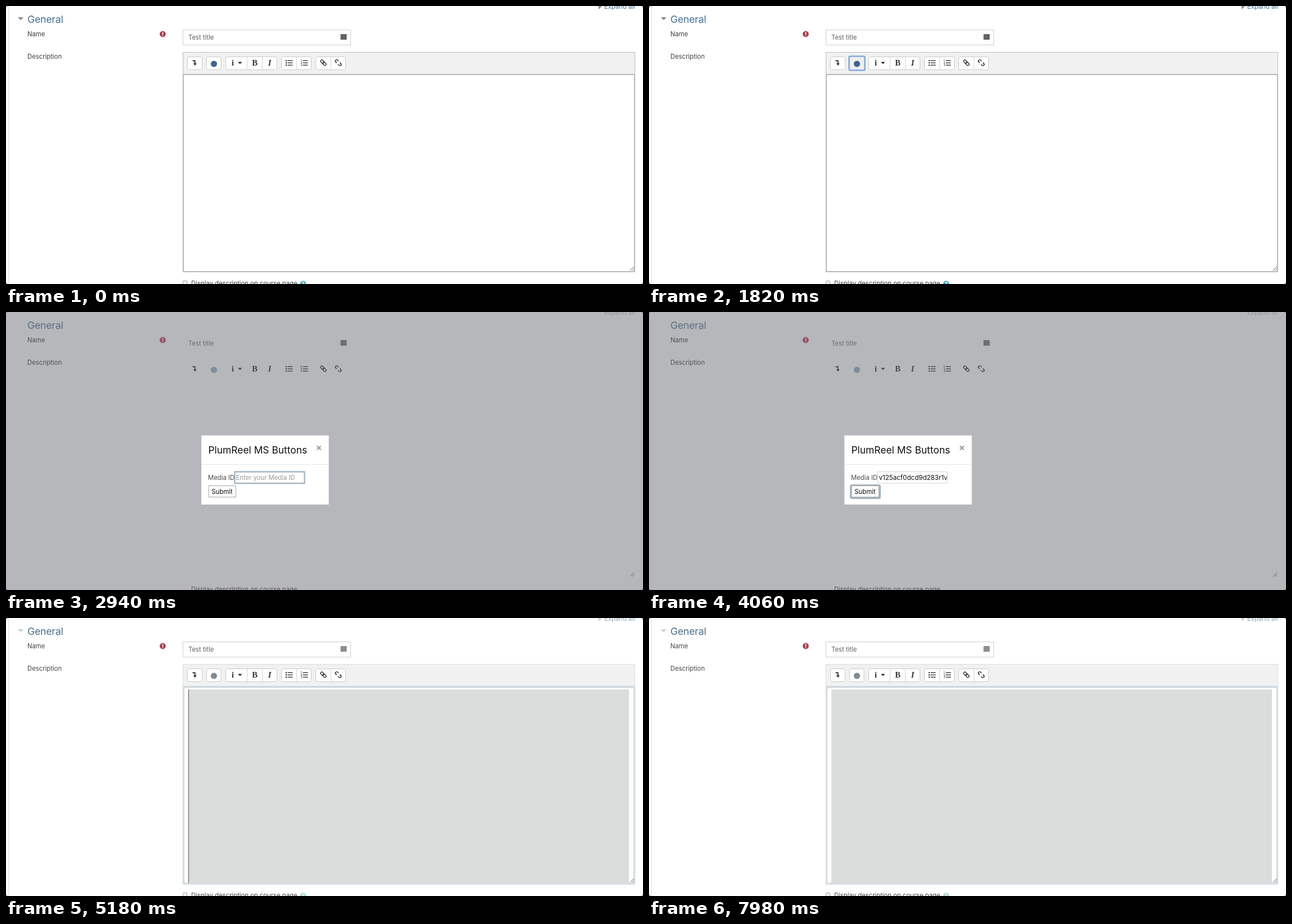
An HTML page with a canvas that plays this animation: 1132x495 px, repeating every 8 s.

```html
<!DOCTYPE html>
<html lang="en">
<head>
<meta charset="utf-8">
<title>Editor button demo</title>
<style>
  html, body { margin: 0; width: 100%; height: 100%; overflow: hidden; background: #fff; }
  canvas { display: block; }
</style>
</head>
<body>
<canvas id="stage" width="1132" height="495"></canvas>
<script>
const W = 1132, H = 495, LOOP = 8000;
const ctx = document.getElementById('stage').getContext('2d');
const SANS = 'Inter, Roboto, sans-serif';
const SERIF = '"Liberation Serif", "Noto Serif", serif';

// Moments of the user's actions, in ms
const T = { press: 1750, open: 1890, focusField: 2590, paste: 3080, submit: 3990, insert: 4130 };
const CARET_PERIOD = 1000;

const plain = {
  bg: '#fff', text: '#3c3f42', heading: '#44708f', link: '#44708f', toggle: '#8b8b8b',
  alert: '#a5414a', field: '#5c6063', key: '#636363', logo: '#426591', icon: '#333',
  help: '#46a8bd', barBorder: '#bcbcbc', areaBorder: '#b8b8b8', boxes: true
};
const dimmed = {
  ...plain, bg: '#b6b7bb', text: '#505357', heading: '#5c7182', link: '#96999d',
  alert: '#96505f', field: '#6a6d71', key: '#6c6f73', logo: '#7e8c9b', icon: '#45484c', boxes: false
};
const inserted = {
  ...plain, text: '#43474a', heading: '#4c7087', link: '#8fa7b5', toggle: '#cfd0d0',
  field: '#5f6366', key: '#8b8e90', logo: '#818b94', help: '#a9d3d1', barBorder: '#dcdddd'
};

function fill(color, x, y, w, h) {
  ctx.fillStyle = color;
  ctx.fillRect(x, y, w, h);
}

function box(x, y, w, h, border, { inside, radius = 0, line = 1 } = {}) {
  ctx.beginPath();
  ctx.roundRect(x, y, w, h, radius);
  if (inside) { ctx.fillStyle = inside; ctx.fill(); }
  ctx.strokeStyle = border;
  ctx.lineWidth = line;
  ctx.stroke();
}

function text(str, x, y, color, size = 11.3, { weight = 400, family = SANS, align = 'left', style = '' } = {}) {
  ctx.font = `${style} ${weight} ${size}px ${family}`;
  ctx.textAlign = align;
  ctx.fillStyle = color;
  ctx.fillText(str, x, y);
}

function poly(color, ...pts) {
  ctx.beginPath();
  pts.forEach(([x, y]) => ctx.lineTo(x, y));
  ctx.fillStyle = color;
  ctx.fill();
}

function path(color, width, ...pts) {
  ctx.beginPath();
  pts.forEach(([x, y]) => ctx.lineTo(x, y));
  ctx.strokeStyle = color;
  ctx.lineWidth = width;
  ctx.stroke();
}

function disc(color, x, y, r) {
  ctx.beginPath();
  ctx.arc(x, y, r, 0, Math.PI * 2);
  ctx.fillStyle = color;
  ctx.fill();
}

// A run of joined buttons; edges are the x positions of the borders
function buttonGroup(edges) {
  const left = edges[0], right = edges[edges.length - 1];
  box(left + .5, 90.5, right - left - 1, 23, '#cbcbcb', { inside: '#fff', radius: 3 });
  edges.slice(1, -1).forEach(x => fill('#d2d2d2', x, 91, 1, 22));
}

function chain(x, y, color) {
  ctx.save();
  ctx.translate(x, y);
  ctx.rotate(Math.PI / 4);
  const link = { radius: 2.2, line: 1.4 };
  box(-6, -2.2, 6.6, 4.4, color, link);
  box(-.6, -2.2, 6.6, 4.4, color, link);
  ctx.restore();
}

// Two open half links with small sparks beside the break
function brokenChain(x, y, color) {
  ctx.save();
  ctx.translate(x, y);
  ctx.rotate(Math.PI / 4);
  ctx.strokeStyle = color;
  ctx.lineWidth = 1.4;
  for (const side of [-1, 1]) {
    ctx.beginPath();
    ctx.moveTo(side * 1.6, -2.4);
    ctx.lineTo(side * 4, -2.4);
    ctx.arc(side * 4, 0, 2.4, -Math.PI / 2, Math.PI / 2, side < 0);
    ctx.lineTo(side * 1.6, 2.4);
    ctx.stroke();
  }
  ctx.restore();
  path(color, .9, [x - 5, y - 2.5], [x - 3, y - 1.8]);
  path(color, .9, [x + 3, y + 1.8], [x + 5, y + 2.5]);
}

function listIcon(x, color, numbered) {
  [97, 101, 105].forEach((y, i) => {
    fill(color, x - 2.5, y - .4, 9, 1.4);
    if (numbered) text(i + 1, x - 6.5, y + 2, color, 4.6, { weight: 500 });
    else disc(color, x - 5, y + .3, 1.2);
  });
}

function toolbarIcons(c) {
  path(c.icon, 1.8, [331.5, 97.5], [335.8, 97.5], [335.8, 103]);
  poly(c.icon, [332.8, 102], [338.8, 102], [335.8, 106.3]);
  disc(c.logo, 369.5, 103, 5.6);
  const serif = { weight: 700, family: SERIF, align: 'center' };
  text('i', 403, 105.5, c.icon, 14.5, serif);
  poly(c.icon, [412, 99.5], [419.5, 99.5], [415.75, 103.5]);
  text('B', 442, 106, c.icon, 14.5, serif);
  text('I', 468.5, 106, c.icon, 14.5, { ...serif, style: 'italic' });
  listIcon(503, c.icon, false);
  listIcon(530, c.icon, true);
  chain(564, 101, c.icon);
  brokenChain(590.5, 101, c.icon);
}

function drawForm(c, pressed) {
  fill(c.bg, 0, 0, W, H);
  if (c.boxes) {
    fill('#dcdcdc', 4, 0, 1, H);
    poly(c.toggle, [21, 20], [31, 20], [26, 25.3]);
    poly(c.toggle, [1053, -4], [1058.5, 1], [1053, 6]);
    box(314.5, 42.5, 298, 27, '#cfcfcf');
    fill('#f1f1f1', 314, 82, 804, 40);
    box(314.5, 82.5, 803, 39, c.barBorder);
    [[322, 349], [356, 382.5], [390, 428, 455, 482], [489, 516, 543], [550, 577, 604]].forEach(buttonGroup);
    box(315, 122, 802, 351, c.areaBorder, { inside: '#fff', line: 2 });
    box(314.5, 489.5, 7.5, 8, '#a9a9a9', { inside: '#eee', radius: 1 });
    disc(c.help, 528, 494.5, 5.3);
    text('?', 528, 498, '#fff', 9, { weight: 700, align: 'center' });
  }
  if (pressed) box(355.5, 89.5, 28, 25, '#84a8dd', { inside: '#eeeff1', radius: 2, line: 2.6 });

  text('Expand all', 1063, 5, c.link);
  ctx.letterSpacing = '-0.3px';
  text('General', 38, 29.5, c.heading, 17.8);
  ctx.letterSpacing = '0px';
  text('Name', 38, 54, c.text);
  text('Description', 38, 94, c.text);
  disc(c.alert, 278.5, 50, 5.4);
  fill(c.boxes ? '#fff' : '#c9c0c5', 277.7, 46.5, 1.7, 4.4);
  fill(c.boxes ? '#fff' : '#c9c0c5', 277.7, 52, 1.7, 1.6);
  text('Test title', 324, 60, c.field);
  fill(c.key, 594.5, 50, 11, 10);
  toolbarIcons(c);
  text('Display description on course page', 329, 498.3, c.text);
}

function resizeGrip() {
  path('#666', 1, [1109, 471], [1116, 464]);
  path('#666', 1, [1113, 471], [1116, 468]);
}

function drawDialog(t) {
  fill('#fff', 347.2, 219.8, 226.4, 123);
  fill('#e6e6e6', 347.2, 271, 226.4, 1);
  text('PlumReel MS Buttons', 359.5, 252, '#111', 17.4);
  path('#a0a0a0', 2.4, [552.5, 238.5], [559.5, 245.5]);
  path('#a0a0a0', 2.4, [559.5, 238.5], [552.5, 245.5]);

  text('Media ID', 359, 299, '#4a4a4a');
  const inField = t >= T.focusField && t < T.submit;
  box(406.5, 284.5, 124, 20.5, inField ? '#a6b6c6' : '#d4d4d4', { line: inField ? 2.4 : 1 });
  ctx.save();
  ctx.beginPath();
  ctx.rect(408, 285, 121.5, 19);
  ctx.clip();
  if (t >= T.paste) text('v125acf0dcd9d283r1v', 408.5, 299, '#111', 11.6);
  else text('Enter your Media ID', 408.5, 299, '#999');
  ctx.restore();

  if (t >= T.submit) box(358.5, 308.5, 52, 23, '#a8b4c0', { radius: 2, line: 3 });
  box(360, 309.5, 48.5, 20, '#a4a4a4', { inside: '#fff' });
  text('Submit', 384, 324, '#111', 11.4, { align: 'center' });
}

function drawInserted(t) {
  box(315.5, 123, 801, 350, '#d5dde2', { inside: '#fff', line: 3.4 });
  fill('#dbdddc', 324, 127, 783, 345);
  if ((t - T.insert) % CARET_PERIOD < CARET_PERIOD / 2) fill('#555', 324, 127, 1, 345);
}

function windowCorners() {
  const s = 2.5;
  [[0, 0, s, s], [W, 0, -s, s], [0, H, s, -s], [W, H, -s, -s]].forEach(
    ([x, y, dx, dy]) => poly('#777', [x, y], [x + dx, y], [x, y + dy]));
}

function render(t) {
  const dialog = t >= T.open && t < T.insert;
  const done = t >= T.insert;
  drawForm(dialog ? dimmed : done ? inserted : plain, t >= T.press && t < T.open);
  if (done) drawInserted(t);
  resizeGrip();
  if (dialog) drawDialog(t);
  windowCorners();
}

const start = performance.now();
function tick() {
  render((performance.now() - start) % LOOP);
  requestAnimationFrame(tick);
}
tick();
</script>
</body>
</html>
```
